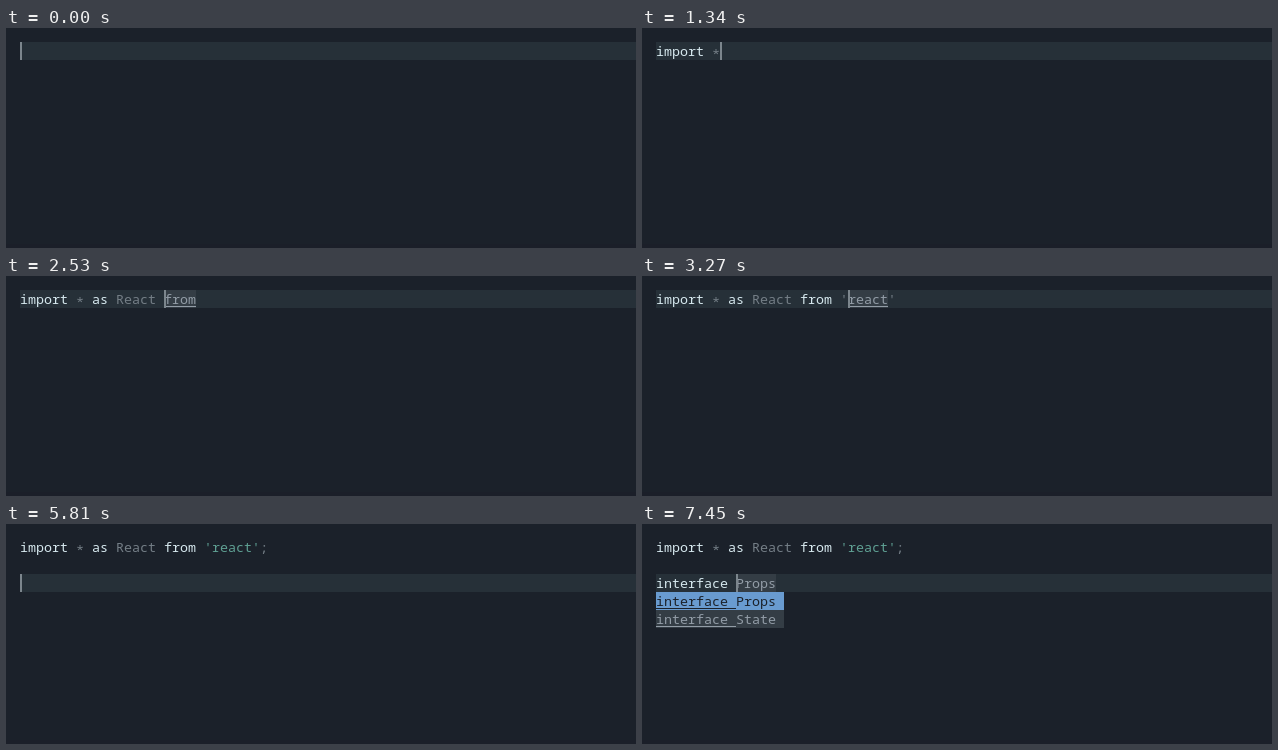
Animation, 630 px wide and 220 px high, one loop 8 s. Source, as an HTML page:

```html
<!DOCTYPE html>
<html lang="en">
<head>
<meta charset="utf-8">
<style>
html, body { margin: 0; width: 630px; height: 220px; overflow: hidden; background: #1b212a; }
body { position: relative; font: 13.3333px/18px "Noto Sans Mono", monospace; font-variant-ligatures: none; }
body > div { position: absolute; left: 14px; height: 18px; white-space: pre; }
#band { width: 616px; background: #263038; }
#caret { width: 2px; background: #7c868d; }
#foot { left: 0; top: 216px; width: 630px; height: 4px; background: #1b1f29; }
span { display: inline-block; height: 18px; vertical-align: top; color: #747e86; }
.key { color: #d6e8ee; }
.str { color: #5fa093; }
.hint { color: #929ca6; background-color: #343d45; }
.line { background-image: linear-gradient(currentColor, currentColor); background-size: 100% 1px; background-position: 0 16px; background-repeat: no-repeat; }
.star { position: relative; top: 3px; }
.item { width: 128px; background: #343d45; }
.item span { color: #929ca6; }
.picked { background: #699bd0; }
.picked span { color: #1b212a; }
</style>
</head>
<body>
<div id="band"></div>
<div id="row0" style="top:14px"></div>
<div id="row2" style="top:50px"></div>
<div id="menu0" class="item picked" style="top:68px"><span class="line">interface </span><span>Props</span></div>
<div id="menu1" class="item" style="top:86px"><span class="line">interface </span><span>State</span></div>
<div id="caret"></div>
<div id="foot"></div>
<script>
const LOOP = 8000;
const el = id => document.getElementById(id);
const span = (text, kind = '') => `<span class="${kind}">${text}</span>`;
const key = text => span(text, 'key');
const hint = text => span(text, 'hint line');

const head = key('import') + ' ';
const star = head + span('*', 'star');
const as = star + ' ' + key('as');
const react = as + ' ' + span('React');
const from = react + ' ' + key('from');
const quoted = from + ' ' + span("'react'");
const done = from + ' ' + span("'react'", 'str') + span(';');

// start time, caret row, caret column, first line, third line, menu shown
const steps = [
  [0, 0, 0, ''],
  [450, 0, 2, span('im') + hint('port')],
  [600, 0, 5, span('impor') + hint('t')],
  [900, 0, 7, head + hint(span('*', 'hint star') + ' as ')],
  [1340, 0, 8, star],
  [1490, 0, 9, star + ' ' + hint('as')],
  [1940, 0, 11, as],
  [2090, 0, 12, as + ' ' + hint('React')],
  [2380, 0, 17, react],
  [2530, 0, 18, react + ' ' + hint('from')],
  [2980, 0, 22, from],
  [3120, 0, 23, from],
  [3270, 0, 24, from + ' ' + span("'") + hint('react') + span("'")],
  [3710, 0, 29, quoted],
  [4010, 0, 30, quoted],
  [4460, 1, 0, done],
  [5810, 2, 0, done],
  [6410, 2, 3, done, span('int') + hint('erface')],
  [6560, 2, 4, done, span('inte') + hint('rface')],
  [6710, 2, 5, done, span('inter') + hint('face')],
  [6860, 2, 9, done, key('interface')],
  [7450, 2, 10, done, key('interface') + ' ' + span('Props', 'hint'), true]
];

let shown;
function draw() {
  const time = performance.now() % LOOP;
  const step = steps.findLast(s => s[0] <= time);
  if (step !== shown) {
    shown = step;
    const [, row, col, first, third = '', menu = false] = step;
    el('row0').innerHTML = first;
    el('row2').innerHTML = third;
    el('band').style.top = el('caret').style.top = 14 + 18 * row + 'px';
    el('caret').style.left = 14 + 8 * col + 'px';
    el('menu0').hidden = el('menu1').hidden = !menu;
  }
  requestAnimationFrame(draw);
}
draw();
</script>
</body>
</html>
```
